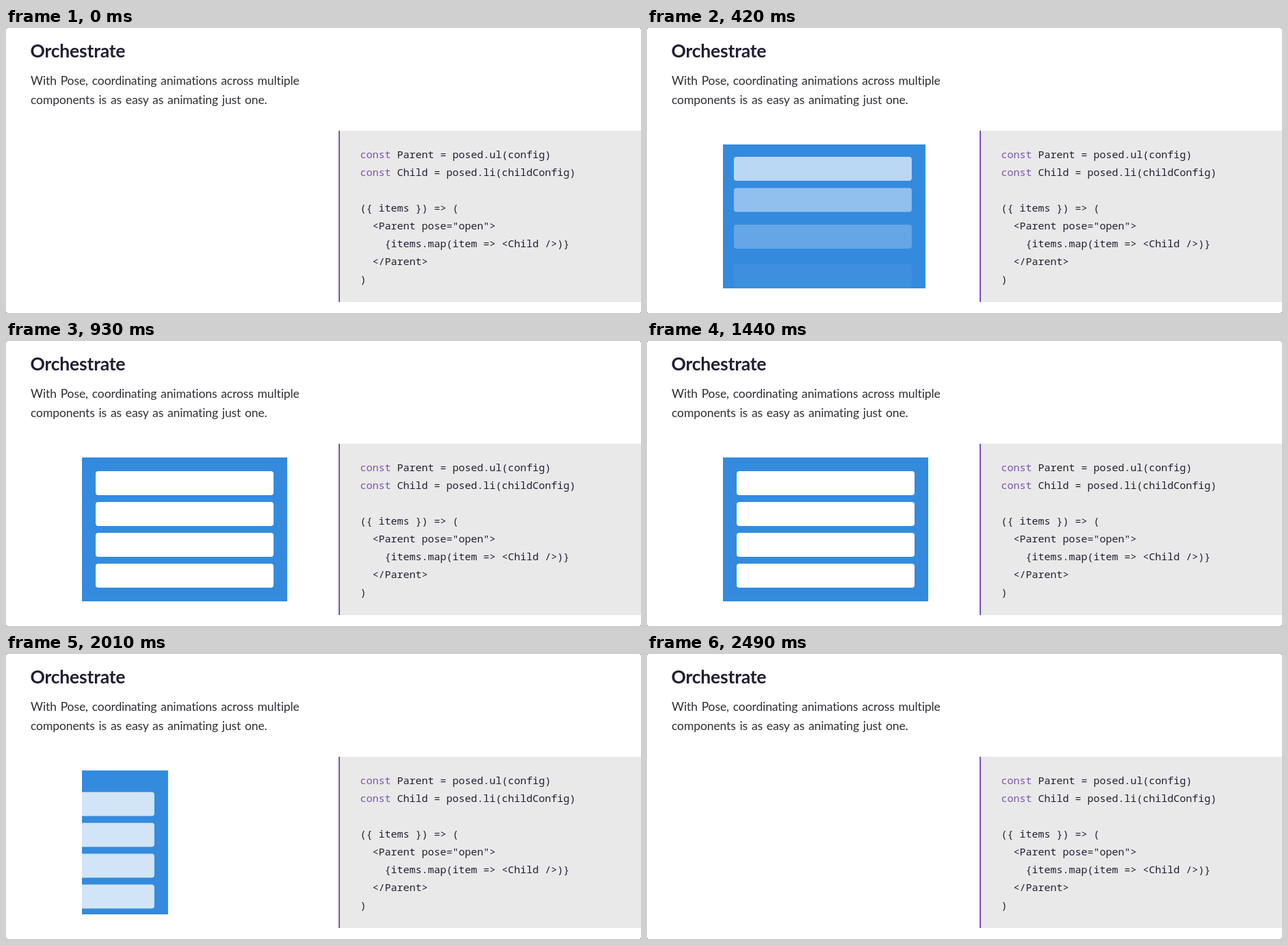
An HTML page for the animation above (2.61 s loop, 928 by 416 pixels).

```html
<!DOCTYPE html>
<html lang="en">
<head>
<meta charset="utf-8">
<title>Orchestrate</title>
<style>
  html, body { margin: 0; width: 100%; height: 100%; overflow: hidden; background: #888; }
  svg { display: block; width: 928px; height: 416px; background: #fff; border-radius: 3px; }
  text { fill: #221d33; white-space: pre; }
  .title { font: 700 26.5px Lato, sans-serif; letter-spacing: -.2px; }
  .intro { font: 17.5px Lato, sans-serif; letter-spacing: -.1px; word-spacing: 1.4px; }
  .intro text { fill: #2e2d33; }
  .code { font: 500 15px "Noto Sans Mono", monospace; }
  .keyword { fill: #7c55aa; }
</style>
</head>
<body>
<svg viewBox="0 0 928 416">
  <clipPath id="window"><rect x="111" y="170" width="300" height="210"/></clipPath>
  <text class="title" x="35.5" y="43">Orchestrate</text>
  <g class="intro">
    <text x="36" y="83">With Pose, coordinating animations across multiple</text>
    <text x="36" y="111">components is as easy as animating just one.</text>
  </g>
  <g clip-path="url(#window)">
    <g id="panel"><rect x="111" y="170" width="300" height="210" fill="#348bdd"/></g>
  </g>
  <rect x="486" y="150" width="442" height="250" fill="#e9e9e9"/>
  <rect x="486" y="150" width="2" height="250" fill="#7b52ab"/>
  <g class="code" transform="translate(517.5 0)">
    <text y="190"><tspan class="keyword">const</tspan> Parent = posed.ul(config)</text>
    <text y="216"><tspan class="keyword">const</tspan> Child = posed.li(childConfig)</text>
    <text y="268">({ items }) =&gt; (</text>
    <text y="294">  &lt;Parent pose="open"&gt;</text>
    <text y="320">    {items.map(item =&gt; &lt;Child /&gt;)}</text>
    <text y="346">  &lt;/Parent&gt;</text>
    <text y="372">)</text>
  </g>
</svg>
<script>
  const LOOP = 2610, STEP = 30, SPEED = 1.13;
  const OPEN = 133, CHILDREN = 245, STAGGER = 55, CLOSE = 1951;
  const panel = document.getElementById('panel');

  const items = Array.from({ length: 4 }, (_, i) => {
    const item = document.createElementNS('http://www.w3.org/2000/svg', 'rect');
    const attributes = { x: 131, y: 190 + 45 * i, width: 260, height: 35, rx: 4, fill: '#fff' };
    for (const name in attributes) item.setAttribute(name, attributes[name]);
    return panel.appendChild(item);
  });

  // Progress of a spring with stiffness 500, damping 25 and mass 1
  function spring(ms) {
    if (ms <= 0) return 0;
    const t = ms * SPEED / 1000, decay = 12.5, omega = Math.sqrt(500 - decay * decay);
    return 1 - Math.exp(-decay * t) * (Math.cos(omega * t) + decay / omega * Math.sin(omega * t));
  }

  const fade = ms => Math.min(1, Math.max(0, ms * SPEED / 300));

  // Goes from 0 to 1 after the start and back to 0 after closing
  const openness = (ease, t, start) => ease(t - start) - ease(t - CLOSE);

  function draw(now) {
    const t = Math.floor(now % LOOP / STEP) * STEP;
    panel.setAttribute('transform', `translate(${300 * (openness(spring, t, OPEN) - 1)} 0)`);
    items.forEach((item, i) => {
      const start = CHILDREN + STAGGER * i;
      item.setAttribute('transform', `translate(0 ${20 * (1 - openness(spring, t, start))})`);
      item.setAttribute('opacity', openness(fade, t, start));
    });
    requestAnimationFrame(draw);
  }
  draw(performance.now());
</script>
</body>
</html>
```
